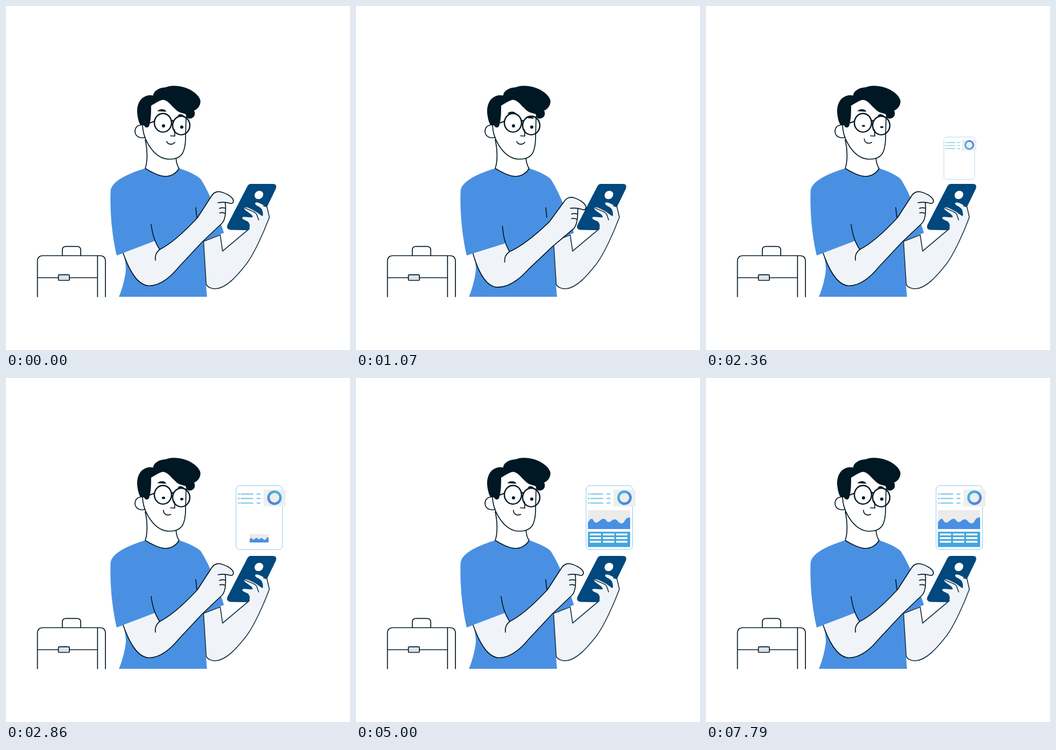
Recreate the animation shown at these times as an HTML page. Size 640x640 px, loop 9.57 s.

```html
<!DOCTYPE html>
<html lang="en">
<head>
<meta charset="utf-8">
<title>Man using a phone</title>
<style>
html, body { margin: 0; width: 100%; height: 100%; overflow: hidden; background: #fff; }
svg { display: block; width: 100vw; height: 100vh; }
.line { fill: none; stroke: #001824; stroke-width: 1.7; stroke-linecap: round; stroke-linejoin: round; }
.ink { fill: #001824; }
.shirt { fill: #4a90e2; }
.skin { fill: #f0f4f8; }
.white { fill: #fff; }
.back { stroke: #1c3a50; }
</style>
</head>
<body>
<svg viewBox="0 0 640 640">
  <defs>
    <linearGradient id="ring" x1="0" y1="0" x2="0" y2="1">
      <stop offset=".1" stop-color="#45afe0"/>
      <stop offset=".8" stop-color="#4a86e0"/>
    </linearGradient>
  </defs>

  <g id="bag" class="line" style="stroke-linecap:butt">
    <path d="M58.5 541.5V475Q58.5 464.5 69 464.5H174.5Q185 464.5 185 475V541.5M170.3 464.5V541.5M58.5 505.5H170.3"/>
    <path d="M104.8 464.5V454Q104.8 447.3 111.5 447.3H132Q139 447.3 139 454V464.5"/>
    <rect x="97.5" y="500.2" width="20.5" height="10.3" rx="1.5" fill="#dbe3eb"/>
  </g>

  <g id="torso">
    <path class="shirt" d="M259 302C236 309 194 324 194.500 346C193 395 200 440 206 464L218 459.500C221 470 223 482 223 490C222 506 215 530 210 541H374L372 518L367.500 438L405.500 422C395 390 381 352 363 323C357 315 335 306 322 302C318 310 308 317 297 317C285 317 268 308 259 302Z"/>
    <path class="line" d="M353 375L355 393"/>
  </g>

  <g id="head">
    <path class="line" style="fill:#fff" d="M256 221.500C245 220 240 226 240 234C241 243 249 247 258.500 244.500"/>
    <path class="line" d="M259 249C263 265 264 289 259 302C268 308 285 317 297 317C308 317 318 310 322 302C319 298 317 293 316.300 283"/>
    <path class="line" style="fill:#fff" d="M254 222C255 248 275 285 304 285C326 285 333 274 334 248L335 206"/>
    <g id="brows" class="ink">
      <path d="M281.500 196C285 191 295 190 298.500 196.500C293 197 287 195 281.500 196Z"/>
      <path d="M319 204.500C322 200 328 200.500 331.500 205C327 205.500 323 203.500 319 204.500Z"/>
    </g>
    <path class="ink" d="M274 166.500C258 163 243 175 244 198C245 210 248 220 251 221.500C255 221 257 222 258 224C261 227.500 266 227 267 220C270 210 270 197 270 185.500C277 181 287 175 292 174.500C302 176 306 184 314 191C320 198 327 199 334 201L336 207C339 211 347 210 350 205C352 202 351.500 197 350 194.500C357 192 363 184 361.500 175C358 162 335 147 310 148.500C302 149 299 151 295 151.500C284 152 274 159 274 166.500Z"/>
    <g class="line" style="stroke-width:2.4">
      <ellipse cx="292" cy="217.3" rx="16" ry="17.3"/>
      <ellipse cx="326" cy="222.3" rx="16" ry="17.3"/>
      <path d="M307.500 214Q309.500 212 311 215M276 214.500L268 217.500"/>
    </g>
    <path class="line" d="M313.500 230L314 242L306 241.500"/>
    <ellipse class="pupil ink" cx="293" cy="223" rx="3"/>
    <ellipse class="pupil ink" cx="327" cy="225.3" rx="3"/>
    <path id="smile" class="line"/>
  </g>

  <g id="phone">
    <path fill="#00487d" d="M456 331H496Q505 331 502 340L468 410Q463 417.500 453 417.300L417 416.500Q409 415 412 407L449 335.500Q451 331 456 331Z"/>
    <ellipse class="white" cx="470.5" cy="351.5" rx="8.5" ry="7.4" transform="rotate(-40 470.5 351.5)"/>
    <path class="skin" d="M367.500 438L398.500 426L403 456L453 414L453.500 408C453 404 451 401 448 400C444 398 438 396 440 393C444 391 452 394 459 393C459 390 457 388 454 386C449 382 442 379 443.500 375.500C447 372 456 378 462 381C468 384 473 389 478 391.500C479 378 474 375 468 372C464 370 462 367 465 365.500C473 365 479 372 485.500 373.500L490 393C480 420 462 460 448 479C430 502 410 525 390 526C382 526.500 375 523 372.500 518Z"/>
    <path class="line back" d="M452.500 414.500L403 456L398.500 426L367.500 438L372.500 518C375 523 382 526.500 390 526C410 525 430 502 448 479C462 460 480 420 490 393L485.500 373.500L479 372M445 376C455 381 465 383 466.500 388L470 398"/>
  </g>

  <g id="arm">
    <path class="skin" d="M214 448L272 424L277 437L286 453C306 443 332 420 356.500 393.500L382 354C386 347 393 344 400 346C408 348 418 353 422 359C425 365 421 368.500 417 367L408 365.500C409 374 408.500 382 408 388C407 396 405 401 402 404L365 439L322 485C309 501 290 520.500 266 520.500C243 520 228 488 218 460Z"/>
    <path class="line" d="M214 448L218 460C228 488 243 520 266 520.500C290 520.500 309 501 322 485L365 439L402 404C405 401 407 396 408 388C408.500 382 409 374 408 366"/>
    <path class="line" d="M278 473C277 466 279 458 286 453C306 443 332 420 356.500 393.500L382 354C386 347 393 344 400 346C408 348 418 353 422 359C425 365 421 368.500 417 367C410 365 402 364.500 394.500 366M397 376.500Q402 374.500 408 376M397.500 385Q402 383.500 407 385.500"/>
  </g>
  <path id="sleeve" class="shirt" d="M196 400L206 464L277 437L270 406L230 396Z"/>
  <path id="fold" class="line" d="M270 406.500C272 420 275 437 286 453"/>

  <g id="sparks" fill="none" stroke="#4a90e2" stroke-width="3.6">
    <path pathLength="1" d="M431.300 357.200L418 349.200"/>
    <path pathLength="1" d="M436.300 351.800L429.700 338"/>
  </g>

  <g id="card">
    <rect class="white" x="428" y="200.2" width="86.5" height="119" rx="7" stroke="#8bcaef"/>
    <g id="list" fill="#82c8ec"></g>
    <rect x="479" y="207.5" width="41" height="31.5" fill="#eee"/>
    <circle id="donut" cx="499.5" cy="222.7" r="11.2" fill="none" stroke="url(#ring)" stroke-width="4.6"/>
  </g>
  <g id="chart">
    <path fill="#ebebeb" d="M431.500 246H510V281H431.500Z"/>
    <path class="shirt" d="M431.500 281V268C434 266 435 262 438.500 262C442 262 442 269 446.500 269C452 269 455 262 460.500 262C466 262 465 268 470.500 268C475 268 476 263 481 263C487 263 488 270.500 494 270.500C501 270.500 499 259 510 259.500V281Z"/>
  </g>
  <g id="table">
    <rect x="431.5" y="286" width="78.5" height="28.5" rx="1" fill="#43a5df"/>
    <g id="cells" class="white"></g>
  </g>
</svg>
<script>
const LOOP = 9570, FPS = 14;
const $ = id => document.getElementById(id);
const pupils = document.querySelectorAll('.pupil');
const ramp = (t, a, b) => Math.min(1, Math.max(0, (t - a) / (b - a)));
const ease = u => (1 - Math.cos(Math.PI * u)) / 2;
const mix = (a, b, u) => a + (b - a) * u;

function box(parent, x, y, width, height, rx) {
  const el = document.createElementNS('http://www.w3.org/2000/svg', 'rect');
  Object.entries({ x, y, width, height, rx }).forEach(([k, v]) => el.setAttribute(k, v));
  parent.append(el);
}
for (let row = 0; row < 3; row++) {
  const y = 214.7 + row * 8.4;
  box($('list'), 431.6, y - .5, 3.2, 3.2, 1.6);
  box($('list'), 436, y, 24, 2.2, 1);
  box($('list'), 466, y, 7.5, 2.2, 1);
  for (let col = 0; col < 3; col++) box($('cells'), 435 + col * 24.5, 289.3 + row * 6.8, 21, 3.5, 0);
}

const turn = (id, deg, x, y) => $(id).setAttribute('transform', `rotate(${deg} ${x} ${y})`);

function grow(id, y, s) {
  $(id).style.display = s > 0 ? '' : 'none';
  $(id).setAttribute('transform', `translate(471 ${y}) scale(${s}) translate(-471 ${-y})`);
}

const smileA = [299, 252, 301, 258, 310, 259, 314, 253.5];
const smileB = [293, 246, 293, 253, 299, 257, 306.5, 253.7];

function draw(t) {
  const tap = ease(ramp(t, 0, 1040)) - ease(ramp(t, 1410, 2350));
  const swing = 3.35 * tap;
  turn('arm', swing, 219, 450);
  turn('fold', swing, 219, 450);
  turn('sleeve', swing, 206, 464);
  $('brows').setAttribute('transform', `translate(0 ${4.5 * tap})`);

  const shut = ramp(t, 1070, 1640) - ramp(t, 2570, 3140) + ramp(t, 6000, 6640) - ramp(t, 7220, 7790);
  pupils.forEach(p => p.setAttribute('ry', mix(3, 1.7, shut)));

  const happy = ramp(t, 1450, 2650);
  const [x, y, ...c] = smileA.map((v, i) => mix(v, smileB[i], happy));
  $('smile').setAttribute('d', `M${x} ${y}C${c.join(' ')}`);

  const head = ramp(t, 1350, 1690), tail = ramp(t, 1720, 2010);
  $('sparks').style.display = head > tail ? '' : 'none';
  $('sparks').setAttribute('stroke-dasharray', `0 ${tail} ${head - tail} 2`);

  grow('card', 328.5, ramp(t, 1710, 2690));
  grow('chart', 326, ramp(t, 2410, 3410));
  grow('table', 324.5, ramp(t, 3120, 4120));
  turn('donut', 235 + .3 * (Math.min(t, 5000) - 2360), 499.5, 222.7);
}

const start = performance.now();
function tick() {
  const t = (performance.now() - start) % LOOP;
  draw(Math.floor((t + 5) * FPS / 1000) * 1000 / FPS);
  requestAnimationFrame(tick);
}
draw(0);
requestAnimationFrame(tick);
</script>
</body>
</html>
```
